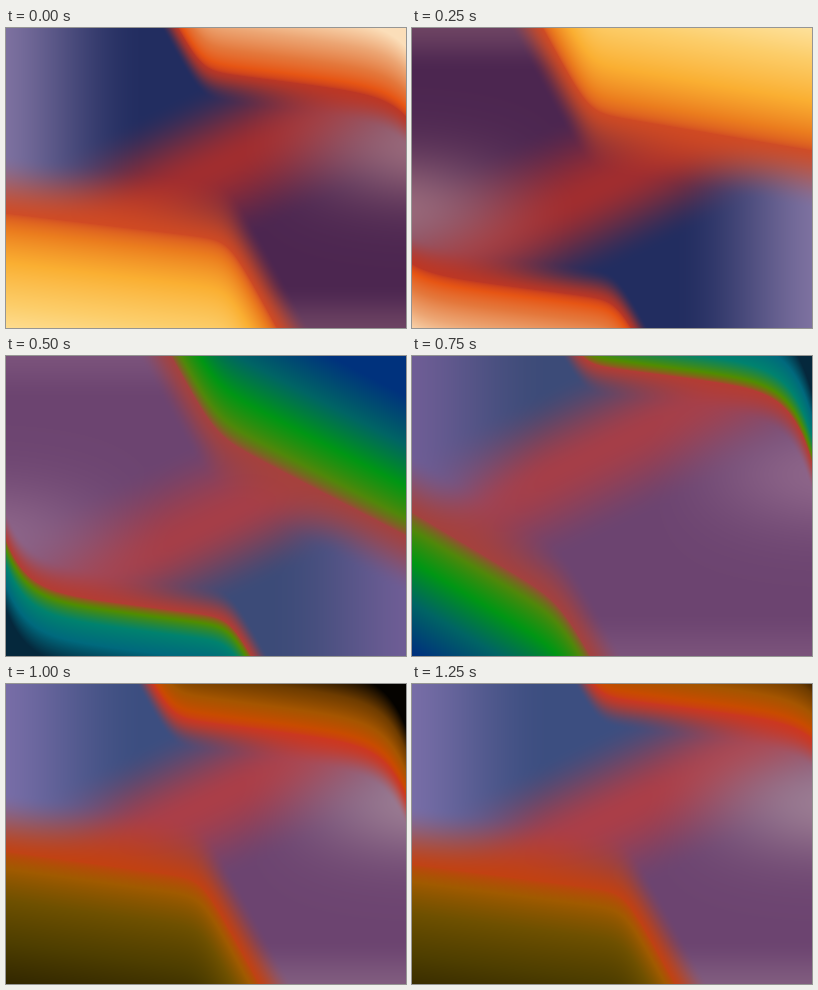
An HTML page with a canvas for the animation above (1.5 s loop, 400 by 300 pixels).

```html
<!DOCTYPE html>
<html lang="en">
<head>
<meta charset="utf-8">
<title>Gradient flow</title>
<style>
html, body { margin: 0; width: 100%; height: 100%; overflow: hidden; background: #000; }
canvas { display: block; width: 100vw; height: 100vh; }
</style>
</head>
<body>
<canvas id="stage" width="400" height="300"></canvas>
<script>
const W = 400, H = 300, STEP = 250;
const LEAN = 0.48;      // tilt of the red ridge
const TOP_SLOPE = 0.13; // tilt of the upper glow

const colors = text => text.split(' ').map(hex => {
  const n = parseInt(hex, 16);
  return [n >> 16, n >> 8 & 255, n & 255];
});

// core: navy, red, purple, left haze, right haze; glows run from the rim outwards
const mood = (core, low, top) => ({ core: colors(core), low: colors(low), top: colors(top) });
const warm = mood('222d60 a02d2f 4c2650 8577a5 a0707f',
  'd24b22 eb7d1e faaf32 fccd69 feebb4', 'be3723 e65514 e4783c eca573 fbdeb9');
const spectral = mood('3c4b78 a53e48 6c4470 735f98 91698c',
  'a5413c 50870a 009614 006464 00327d', 'b43c32 508c00 00826e 00697d 05283c');
const dusk = mood('3c4e80 aa3e48 6c4470 7d70aa a08296',
  'c3410f a05a00 6e5000 4e3e00 2d2300', 'cd371e c84b00 a55500 6e3c00 050300');

// ridge: its height at x = 200
// low: height, slope and tip of the lower glow
// top: height, tip and corner curl of the upper glow, measured upside down
const POSES = [
  { tone: warm, turned: false, ridge: 143, low: [205, 0.12, 222], top: [241, 205, 20] },
  { tone: warm, turned: true, ridge: 145, low: [197, 0.17, 222], top: [256, 205, 10] },
  { tone: spectral, turned: true, ridge: 130, low: [140, 0.52, 190], top: [243, 225, 50] },
  { tone: spectral, turned: false, ridge: 88, low: [176, 0.6, 148], top: [272, 230, 70] },
  { tone: dusk, turned: false, ridge: 118, low: [187, 0.14, 195], top: [246, 235, 50] },
  { tone: dusk, turned: false, ridge: 130, low: [200, 0.13, 212], top: [270, 215, 15] }
];

const clamp = (v, lo, hi) => Math.min(hi, Math.max(lo, v));
const mix = (a, b, t) => a.map((v, i) => v + (b[i] - v) * t);

function smooth(from, to, v) {
  const t = clamp((v - from) / (to - from), 0, 1);
  return t * t * (3 - 2 * t);
}

function softMin(a, b, w) {
  return Math.min(a, b) - w * Math.log1p(Math.exp(-Math.abs(a - b) / w));
}

// Depth inside a glow that lies under a sloped rim and ends at a rounded tip
function depth(x, y, height, slope, tip, curl) {
  const rim = y - height - slope * x + curl * Math.exp(-x / 20);
  const end = tip + 0.55 * (y - height - slope * tip) - x;
  return softMin(rim, end * 1.8, 12);
}

function addGlow(base, ramp, d) {
  const t = Math.pow(clamp((d + 20) / 140, 0, 1), 2 / 3) * (ramp.length - 1);
  const i = Math.min(Math.floor(t), ramp.length - 2);
  return mix(base, mix(ramp[i], ramp[i + 1], t - i), smooth(-80, -12, d));
}

function colorAt(x, y, { tone, ridge, low, top }) {
  const [navy, red, purple, left, right] = tone.core;
  const across = (y - ridge + LEAN * (x - 200)) / Math.hypot(1, LEAN);
  let c = mix(red, across < 0 ? navy : purple, smooth(0, 80, Math.abs(across)));
  c = mix(c, left, smooth(140, -30, x) * smooth(40, -40, across));
  c = mix(c, right, 0.9 * smooth(230, 420, x) * Math.exp(-(((y - 118) / 55) ** 2)));
  c = mix(c, right, 0.4 * smooth(255, 305, y));
  c = addGlow(c, tone.low, depth(x, y, ...low, 0));
  const [height, tip, curl] = top;
  return addGlow(c, tone.top, 2 * depth(W - x, H - y, height, TOP_SLOPE, tip, curl));
}

function paint(pose) {
  const layer = document.createElement('canvas');
  layer.width = W;
  layer.height = H;
  const ctx = layer.getContext('2d');
  const img = ctx.createImageData(W, H);
  for (let y = 0; y < H; y++) {
    for (let x = 0; x < W; x++) {
      const cell = y * W + x;
      const at = pose.turned ? W * H - 1 - cell : cell;
      img.data.set([...colorAt(x, y, pose), 255], at * 4);
    }
  }
  ctx.putImageData(img, 0, 0);
  return layer;
}

const layers = POSES.map(paint);
const stage = document.getElementById('stage').getContext('2d');
const start = performance.now();

function draw() {
  const t = performance.now() - start;
  stage.drawImage(layers[Math.floor(t / STEP) % layers.length], 0, 0);
  requestAnimationFrame(draw);
}
draw();
</script>
</body>
</html>
```
